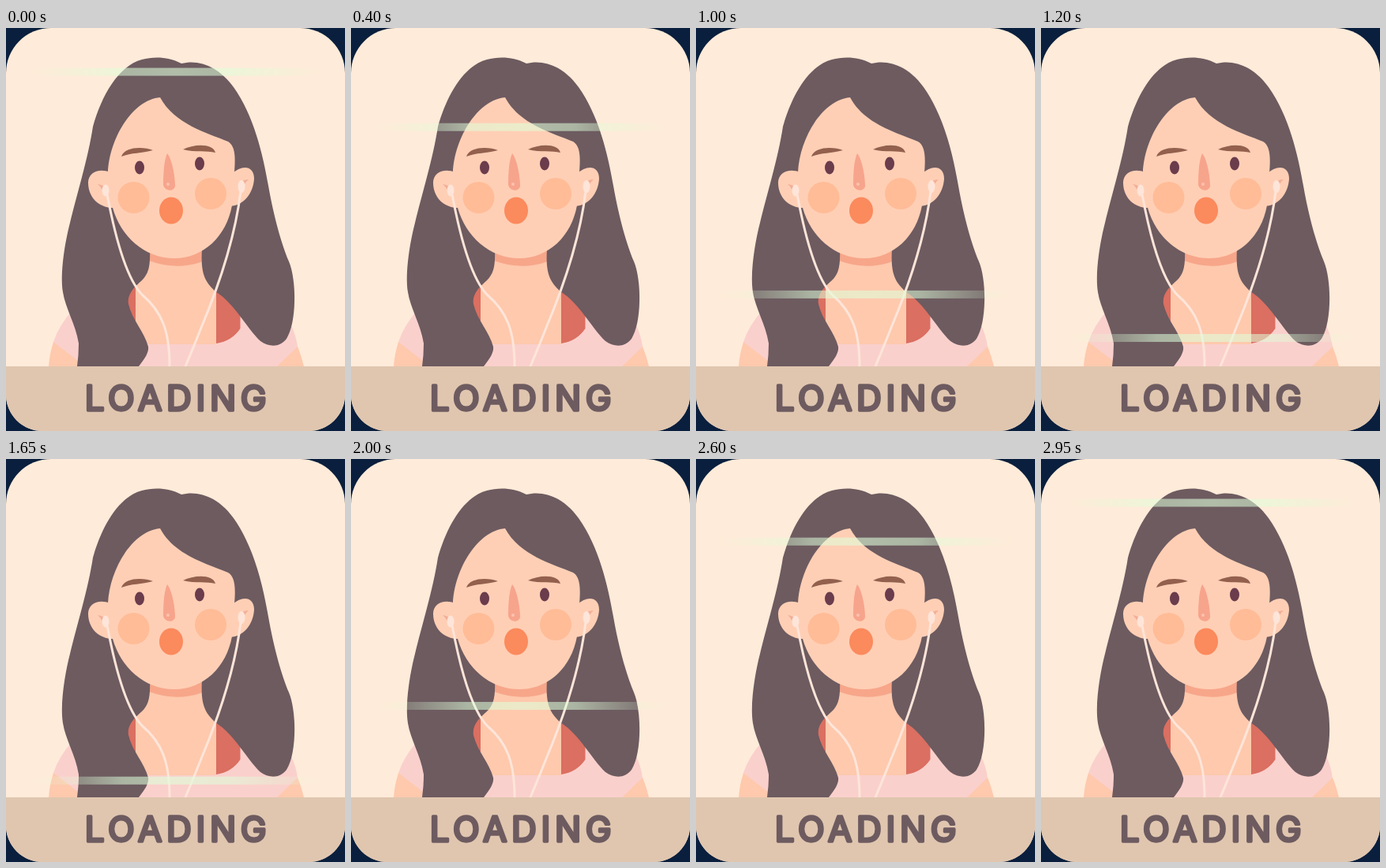
An HTML page for the animation above (3 s loop, 429 by 511 pixels).

```html
<!DOCTYPE html>
<html lang="en">
<head>
<meta charset="utf-8">
<title>Loading portrait</title>
<style>
html, body { margin: 0; width: 100%; height: 100%; overflow: hidden; background: #0a1f3d; }
svg {
  display: block;
  width: 429px;
  height: 511px;
  clip-path: inset(0 round 57px 57px 46px 46px);
}
text {
  font: 400 44px Inter, sans-serif;
  letter-spacing: 5.7px;
  text-anchor: middle;
  fill: #6d5b60;
  stroke: #6d5b60;
  stroke-width: 3.5;
  stroke-linejoin: round;
}
</style>
</head>
<body>
<svg viewBox="0 0 429 511">
  <defs>
    <linearGradient id="glow">
      <stop offset="0" stop-color="#deffd9" stop-opacity="0"/>
      <stop offset=".32" stop-color="#deffd9" stop-opacity=".55"/>
      <stop offset=".5" stop-color="#deffd9" stop-opacity=".6"/>
      <stop offset=".68" stop-color="#deffd9" stop-opacity=".55"/>
      <stop offset="1" stop-color="#deffd9" stop-opacity="0"/>
    </linearGradient>
  </defs>
  <rect width="429" height="511" fill="#ffebd9"/>

  <!-- body -->
  <path fill="#fad0cc" d="M84 358Q67 377 60 398L70 429H360L369 404Q367 390 361 377L297 340H150Z"/>
  <path fill="#fec9ad" d="M60 398L91 422V429H54Q55 414 60 398ZM369 404L343 429H377Q374 416 369 404ZM164 270H266V401H164Z"/>
  <path fill="#db6f61" d="M150 325H164V385H150ZM266 325H296.500V381Q286 397 266 400Z"/>
  <path fill="#f7a68a" d="M181 270H249V296Q216 308 181 295Z"/>

  <!-- hair -->
  <path fill="#6d5b60" d="M222 45C205 36 187 36 172 40C142 48 121 86 110 125C104 165 89 213 81 247C75 270 68 310 72 335C75 355 88 375 92 400Q92 415 90 429H168C176 419 181 411 180 404C175 385 160 371 155 350C153 337 163 328 172 320C180 312 183 303 182 280H248C246 312 252 322 265 334C290 350 304 380 322 397C333 405 347 405 355 394C368 374 368 320 358 296C349 275 339 240 332 200C325 160 314 112 288 75C270 50 245 39 222 45Z"/>

  <!-- head -->
  <g fill="#ffcfb5">
    <path d="M132 183C118 177 104 183 104 196C104 215 118 229 138 228ZM286 185C298 173 314 174 314 191C313 210 300 226 282 226Z"/>
    <path d="M195 88C160 91 131 140 129 183C129 200 131 214 135 228C145 264 175 292 213 292C250 292 279 264 286 225Q289 207 289 183C291 160 289 149 281 144C255 133 213 122 195 88Z"/>
  </g>
  <path fill="#f3ae98" d="M116 198Q124 199 127 204L124 213Q123 204 116 198ZM307 192Q299 192 295 198L298 207Q300 198 307 192Z"/>
  <g fill="#ffbc97"><circle cx="161.500" cy="215" r="20"/><circle cx="259" cy="210" r="20"/></g>
  <path fill="#93604e" d="M146 163C150 150 174 150 186 155C172 159 158 158 146 163ZM224 154C238 147 262 146 265 158C254 155 240 158 224 154Z"/>
  <g fill="#6a3c4c"><ellipse cx="169" cy="177" rx="6" ry="8.500"/><ellipse cx="245" cy="172" rx="6" ry="8.500"/></g>
  <path fill="#f7a48c" d="M204 159C200 167 199 185 199 199C201 207 212 208 214 201C214 188 210 166 204 159Z"/>
  <circle cx="205" cy="198" r="2" fill="#fcc2b0"/>
  <ellipse cx="209" cy="231.500" rx="15" ry="17" fill="#fb8a5d"/>

  <!-- earphones -->
  <g fill="#fee5d9"><ellipse cx="126" cy="206" rx="4.500" ry="7.500"/><ellipse cx="298" cy="201" rx="4.500" ry="8"/></g>
  <path fill="none" stroke="#fee5d9" stroke-width="3" d="M128 211C140 275 155 320 172 338C198 360 207 385 207 429M297 207C290 265 268 330 247 380Q238 403 227 429"/>

  <rect y="429" width="429" height="82" fill="#e0c6af"/>
  <text x="217.500" y="485">LOADING</text>
  <rect id="scan" x="25" width="380" height="10" fill="url(#glow)"/>
</svg>
<script>
const scan = document.getElementById('scan');
const LOOP = 3000, STEP = 50, PEAK = 1463, HALF = 1475;
const TOP = 50.5, TRAVEL = 368.5;

function draw() {
  const t = Math.floor(performance.now() % LOOP / STEP) * STEP;
  const u = Math.max(0, 1 - Math.abs(t - PEAK) / HALF);
  scan.setAttribute('y', TOP + TRAVEL * u * u * (3 - 2 * u));
  requestAnimationFrame(draw);
}
draw();
</script>
</body>
</html>
```
